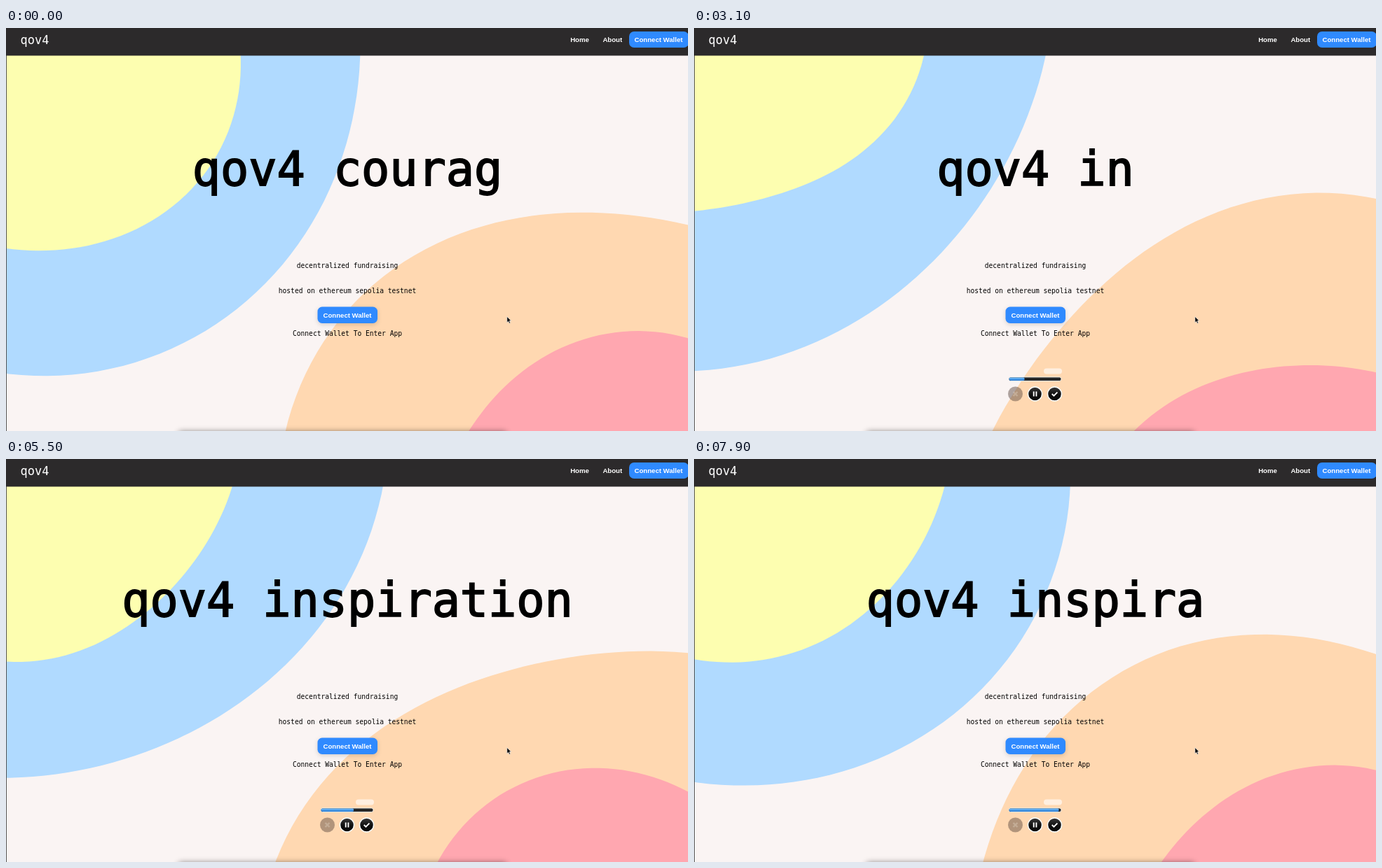
These frames come from a looping animation (973 px wide and 576 px high, 8 s). An HTML page:

```html
<!DOCTYPE html>
<html lang="en">
<head>
<meta charset="utf-8">
<title>qov4</title>
<style>
  html, body { margin: 0; width: 100%; height: 100%; overflow: hidden; background: #faf4f3; }
  svg { display: block; width: 973px; height: 576px; }
  .mono { font-family: "DejaVu Sans Mono", monospace; font-size: 9.6px; text-anchor: middle; }
  .sans { font: bold 9.6px "Liberation Sans", Arial, sans-serif; fill: #fff; text-anchor: middle; }
  #title { font-size: 66.8px; stroke: #000; stroke-width: 1.8; }
  .logo { font-size: 17px; fill: #fff; }
  .lift { filter: drop-shadow(0 2px 3px rgba(0, 0, 0, .15)); }
</style>
</head>
<body>
<svg viewBox="0 0 973 576">
  <defs>
    <linearGradient id="fill" x2="0" y2="1">
      <stop stop-color="#7cc4ff"/><stop offset="1" stop-color="#2277d0"/>
    </linearGradient>
    <linearGradient id="knob" x2="0" y2="1">
      <stop stop-color="#3a3a3a"/><stop offset=".6" stop-color="#0c0c0c"/>
    </linearGradient>
    <filter id="blur" x="-10%" y="-200%" width="120%" height="500%"><feGaussianBlur stdDeviation="4.5"/></filter>
  </defs>
  <rect width="973" height="576" fill="#faf4f3"/>
  <g id="blobs"></g>
  <rect x="246" y="577" width="468" height="12" rx="4" opacity=".5" filter="url(#blur)"/>
  <rect y="39" width="1" height="537" fill="#555"/>

  <rect width="973" height="39.5" fill="#2c2a2b"/>
  <text class="mono logo" x="41" y="23">qov4</text>
  <text class="sans" x="818.5" y="20">Home</text>
  <text class="sans" x="865.3" y="20">About</text>
  <rect x="889" y="5" width="85" height="23" rx="7" fill="#2f8aff"/>
  <text class="sans" x="931" y="20">Connect Wallet</text>

  <text class="mono" id="title" x="487" y="225"></text>
  <text class="mono" x="487" y="342.8">decentralized fundraising</text>
  <text class="mono" x="487" y="379">hosted on ethereum sepolia testnet</text>
  <rect class="lift" x="444.5" y="398.5" width="85.5" height="23.5" rx="6.5" fill="#2f8aff"/>
  <text class="sans" x="487" y="413.5">Connect Wallet</text>
  <text class="mono" x="487" y="440.2">Connect Wallet To Enter App</text>

  <g id="player">
    <rect x="499" y="486.5" width="26" height="8" rx="4" fill="#fff" opacity=".6"/>
    <rect x="449" y="499" width="75" height="5.5" rx="2.7" fill="#262626" stroke="#fff" stroke-opacity=".8"/>
    <rect id="bar" x="449.5" y="499.5" height="4.5" rx="2.2" fill="url(#fill)"/>
    <circle cx="458.5" cy="523" r="10.5" fill="#5c4a40" opacity=".48"/>
    <path d="M455.5 520l6 6m0-6l-6 6" stroke="#e0d0c0" stroke-width="2.4" opacity=".4"/>
    <g fill="url(#knob)" stroke="#fff" stroke-width="1.4">
      <circle cx="486.5" cy="523" r="10"/><circle cx="514.5" cy="523" r="10"/>
    </g>
    <path d="M484.7 519.5v7m3.7-7v7M510.7 523l2.7 2.7 5-5" fill="none" stroke="#fff" stroke-width="1.9"/>
  </g>
  <path d="M714.8 412.5v8.4l1.9-1.7 1.3 3 1.5-.7-1.3-2.9h2.5z" stroke="#fff" stroke-width=".6"/>
</svg>
<script>
const LOOP = 8000;
const RAD = Math.PI / 180;
const $ = id => document.getElementById(id);

// A lumpy disc turning clockwise; each wave is {lobes, height, peak angle}
function blob(color, cx, cy, radius, turnMs, ...waves) {
  const path = document.createElementNS("http://www.w3.org/2000/svg", "path");
  path.setAttribute("fill", color);
  $("blobs").append(path);
  return t => {
    const turn = 360 * t / turnMs;
    const points = [];
    for (let a = 0; a < 360; a += 2) {
      const r = waves.reduce((sum, w) =>
        sum + w.height * Math.cos(w.lobes * (a - turn - w.peak) * RAD), radius);
      points.push((cx + r * Math.cos(a * RAD)).toFixed(1) + " " + (cy + r * Math.sin(a * RAD)).toFixed(1));
    }
    path.setAttribute("d", "M" + points.join("L") + "Z");
  };
}
const wave = (lobes, height, peak) => ({ lobes, height, peak });

const blobs = [
  blob("#b0daff", 22, -22, 500, 20000, wave(2, 26, 67)),
  blob("#fdfeb0", 22, -22, 314, 10000, wave(1, 24, 90), wave(2, 16, 65), wave(3, 9, 30)),
  blob("#ffd8b1", 870, 750, 495, 20000, wave(2, 6, 70), wave(3, 18, 101)),
  blob("#ffa7b0", 880, 760, 304, 15000, wave(2, 26, 106))
];

function typed(t) {
  const steps = from => Math.floor((t - from) / 250);
  if (t < 2400) return "courag".slice(0, Math.max(0, 6 - steps(-100)));
  const count = t < 7100 ? Math.min(11, steps(2400)) : 10 - steps(7100);
  return "inspiration".slice(0, count);
}

function draw() {
  const t = Math.floor(performance.now() % LOOP / 100) * 100;
  blobs.forEach(move => move(t));
  $("title").textContent = ("qov4 " + typed(t)).trim();
  $("player").style.display = t < 1100 ? "none" : "";
  $("bar").setAttribute("width", 12 + (t - 2100) * .0102);
  requestAnimationFrame(draw);
}
draw();
</script>
</body>
</html>
```
